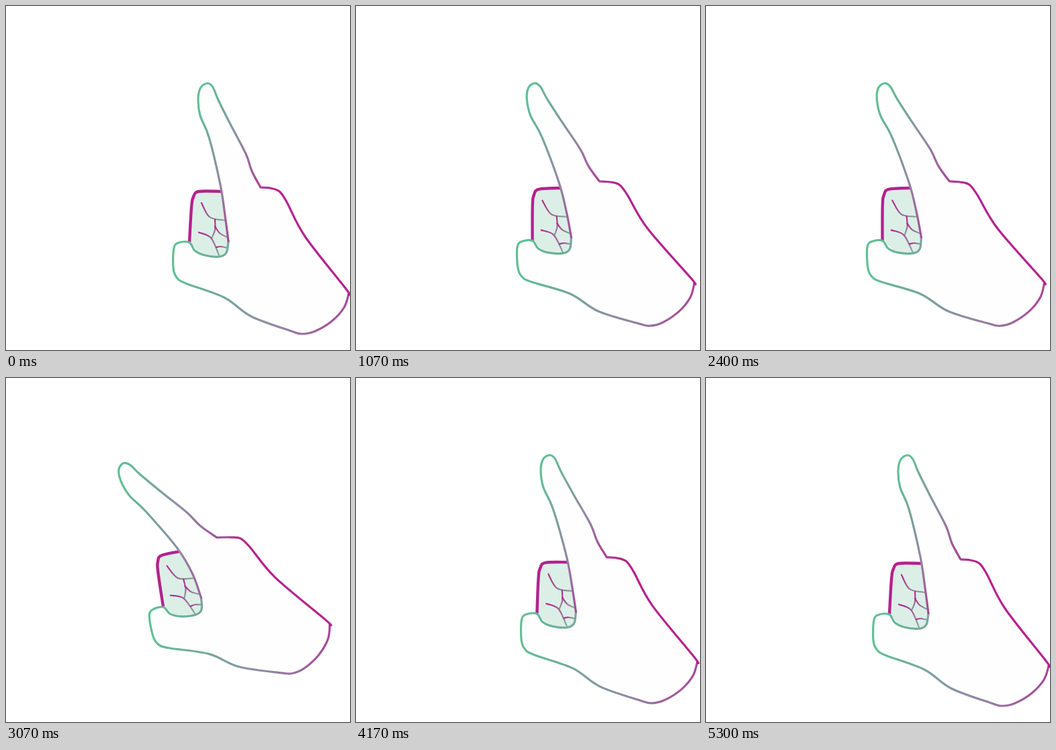
These frames come from a looping animation (512 px wide and 512 px high, 5.43 s). An HTML page with a canvas:

```html
<!DOCTYPE html>
<html lang="en">
<head>
<meta charset="utf-8">
<title>Tapping hand</title>
<style>
  html, body { margin: 0; height: 100%; overflow: hidden; background: #fff; }
  canvas { display: block; width: 100vw; height: 100vh; }
</style>
</head>
<body>
<canvas id="stage" width="512" height="512"></canvas>
<script>
const ctx = document.getElementById('stage').getContext('2d');
const LOOP = 5430, STEP = 80, STEPS_PER_TAP = 17;
const GREEN = '#5fc095', GREY = '#8f8aa3', MAGENTA = '#b4228e', SAGE = '#86ab9f';
const MINT = '#dcefe6', BLUE = '#009dff';
const TILT = 20.2 * Math.PI / 180;

// Key points of the raised hand.
const finger = [
  [331, 350], [326, 312], [319, 266], [302, 195], [289, 163], [286, 138], [290, 121],
  [300, 115], [308, 121], [316, 140], [334, 176], [357, 220], [366, 246], [379, 270]
];
const knuckle = [[393, 271], [407, 276], [418, 292], [445, 343], [506, 421], [510, 429]];
const palm = [
  [510, 429], [503, 449], [485, 469], [460, 484], [441, 488], [425, 484], [365, 462],
  [325, 434], [268, 413], [254, 404], [249, 390], [250, 360], [258, 352],
  [273, 352], [281, 364], [296, 371], [318, 373], [328, 367], [331, 350]
];
const fist = [[273, 351], [276, 300], [279, 284], [287, 276], [321, 276]];
const creases = [
  [[291, 293], [303, 314], [325, 319]],
  [[311, 318], [311, 333], [306, 346]],
  [[311, 328], [318, 338], [329, 344]],
  [[287, 337], [305, 345], [317, 371]],
  [[313, 359], [320, 358], [329, 360]]
];

const mix = (a, b, t) => a + (b - a) * t;
const clamp = t => Math.max(0, Math.min(1, t));
const smooth = t => t * t * (3 - 2 * t);

// Smooth curve through all points, joined to the path so far.
function addCurve(path, pts) {
  const at = i => pts[Math.max(0, Math.min(pts.length - 1, i))];
  path.lineTo(...pts[0]);
  for (let i = 0; i < pts.length - 1; i++) {
    const [a, b, c, d] = [at(i - 1), at(i), at(i + 1), at(i + 2)];
    path.bezierCurveTo(
      b[0] + (c[0] - a[0]) / 6, b[1] + (c[1] - a[1]) / 6,
      c[0] - (d[0] - b[0]) / 6, c[1] - (d[1] - b[1]) / 6, c[0], c[1]);
  }
  return path;
}
const curve = (...runs) => runs.reduce(addCurve, new Path2D());

function gradient(from, to, ...colors) {
  const g = ctx.createLinearGradient(...from, ...to);
  colors.forEach((c, i) => g.addColorStop(i / (colors.length - 1), c));
  return g;
}

function stroke(path, style, width) {
  ctx.strokeStyle = style;
  ctx.lineWidth = width;
  ctx.stroke(path);
}

// 0 = raised, 1 = pressed
function pressAt(step) {
  if (step <= 7) return smooth(step / 7.15);
  if (step >= 15) return 0;
  return 1 - smooth(((step - 7) / 8.3) ** 0.88);
}

// Turns a point about the finger's root; the bend fades out towards the palm.
function bend([x, y], p) {
  const angle = -TILT * p * clamp((320 - y) / 80);
  const c = Math.cos(angle), s = Math.sin(angle);
  const dx = x - 352, dy = y - 320;
  return [352 + dx * c - dy * s, 320 + dx * s + dy * c];
}

function drawBurst(step) {
  if (step < 7 || step > 11) return;
  const t = (step - 7) / 4;
  const inner = mix(25, 104, t);
  const outer = mix(53, 110, Math.sin(t * Math.PI / 2));
  for (let i = 0; i < 8; i++) {
    ctx.save();
    ctx.translate(116, 168);
    ctx.rotate(i * Math.PI / 4);
    stroke(curve([[inner, -2], [outer, -2]]), BLUE, 10);
    ctx.restore();
  }
}

function drawHand(p) {
  ctx.save();
  ctx.translate(330 - 86.3 * p, 300 - 36.6 * p);
  ctx.rotate(-TILT * p);
  ctx.translate(-330, -300);

  ctx.fillStyle = MINT;
  ctx.fill(curve(fist, [[324, 276], [330, 360], [318, 373], [290, 370]]));
  for (const c of creases) stroke(curve(c), gradient(c[0], c[2], MAGENTA, SAGE), 2.2);
  stroke(curve(fist), MAGENTA, 4.4);

  const bent = finger.map(pt => bend(pt, p));
  const back = [bent[bent.length - 1], ...knuckle];
  ctx.fillStyle = '#fefefe';
  ctx.fill(curve(bent, back, palm));
  stroke(curve(palm), gradient([250, 390], [570, 445], GREEN, GREY, MAGENTA), 3.2);
  stroke(curve(bent, back), gradient(bend([300, 115], p), [445, 190], GREEN, GREY, MAGENTA), 3.2);
  ctx.restore();
}

function draw(time) {
  const step = Math.floor((time % LOOP) / STEP) % STEPS_PER_TAP;
  ctx.fillStyle = '#fff';
  ctx.fillRect(0, 0, 512, 512);
  ctx.lineCap = ctx.lineJoin = 'round';
  drawBurst(step);
  drawHand(pressAt(step));
}

const start = performance.now();
function tick() {
  draw(performance.now() - start);
  requestAnimationFrame(tick);
}
tick();
</script>
</body>
</html>
```
